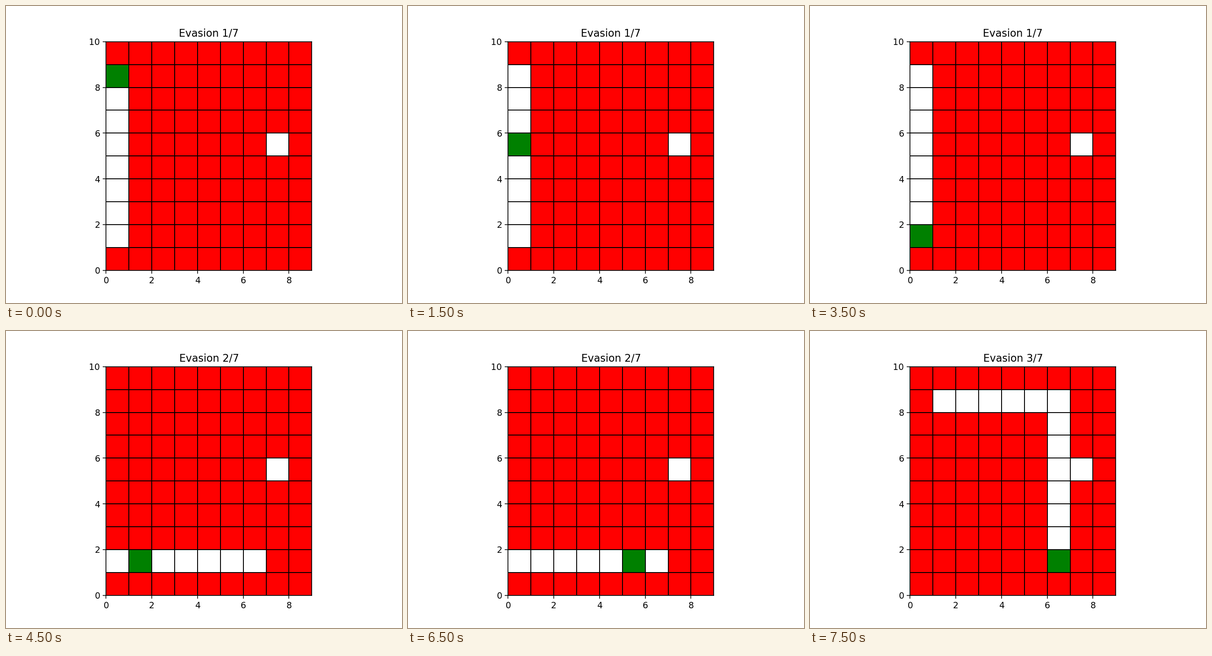
A matplotlib script for the animation above (8 s loop, 864 by 648 pixels).

```python
import matplotlib.pyplot as plt
from matplotlib.animation import FuncAnimation
from matplotlib.patches import Rectangle

COLS, ROWS = 9, 10
STEP_MS = 500
EXIT = (7, 5)


def column(x, y0, y1):
    step = 1 if y1 >= y0 else -1
    return [(x, y) for y in range(y0, y1 + step, step)]


def row(y, x0, x1):
    return [(x, y) for x in range(x0, x1 + 1)]


# Each stage: the open corridor and how many of its cells are walked.
STAGES = [
    (column(0, 8, 1), 8),
    (row(1, 0, 6), 7),
    (column(6, 1, 8) + row(8, 1, 5), 1),
]
STEPS = [(n, path, path[i])
         for n, (path, walked) in enumerate(STAGES, 1)
         for i in range(walked)]

fig, ax = plt.subplots(figsize=(6.4, 4.8), dpi=135)
ax.set_xlim(0, COLS)
ax.set_ylim(0, ROWS)
ax.set_aspect("equal")
title = ax.set_title("")

cells = {(x, y): ax.add_patch(Rectangle((x, y), 1, 1, facecolor="red",
                                        edgecolor="black", linewidth=1))
         for x in range(COLS) for y in range(ROWS)}


def update(k):
    stage, path, walker = STEPS[k]
    title.set_text(f"Evasion {stage}/7")
    for pos, cell in cells.items():
        if pos == walker:
            color = "green"
        elif pos in path or pos == EXIT:
            color = "white"
        else:
            color = "red"
        cell.set_facecolor(color)
    return [title, *cells.values()]


anim = FuncAnimation(fig, update, frames=len(STEPS), interval=STEP_MS,
                     repeat=True, repeat_delay=0, blit=False)
plt.show()
```
